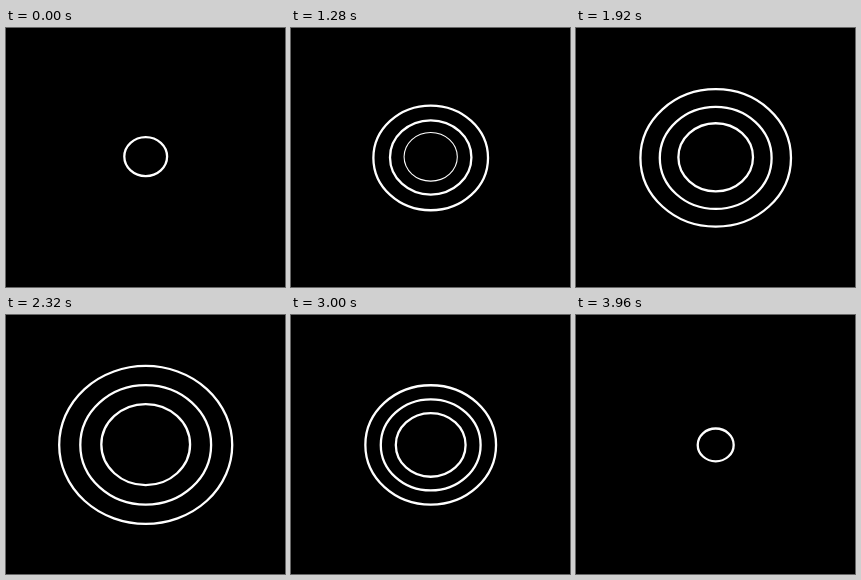
Write an HTML page with a canvas that moves like this. It is 279x259 px and loops after 4000 ms.

```html
<!DOCTYPE html>
<html lang="en">
<head>
<meta charset="utf-8">
<title>Pulsing rings</title>
<style>
  html, body { margin: 0; width: 100%; height: 100%; overflow: hidden; background: #000; }
  canvas { display: block; }
</style>
</head>
<body>
<canvas id="stage" width="279" height="259"></canvas>
<script>
const ctx = document.getElementById('stage').getContext('2d');
const LOOP = 4000, STEP = 40, PEAK = 2480;
const CENTER_X = 139.7, REST_Y = 129.9, SQUASH = 0.913;

// Keyframes are [time, horizontal radius] pairs.
const rings = [
  [[0, 21.4], [PEAK, 91], [LOOP, 16]],
  [[0, 10.3], [PEAK, 69.2], [LOOP, 12.8]],
  [[0, 3.4], [PEAK, 47.2], [LOOP, 11.2]]
];
// A black disc hides the smaller rings until they outgrow it.
const cover = [[0, 20.2], [1280, 26.1], [PEAK, 39.3], [LOOP, 15.6]];

function valueAt(keys, t) {
  const i = keys.findIndex(([time]) => time > t);
  const [t0, v0] = keys[i - 1], [t1, v1] = keys[i];
  return v0 + (v1 - v0) * (t - t0) / (t1 - t0);
}

function ellipsePath(r, y) {
  ctx.beginPath();
  ctx.ellipse(CENTER_X, y, r, r * SQUASH, 0, 0, Math.PI * 2);
}

// Small rings sit slightly higher while growing.
function centerY(r, t) {
  return t < PEAK ? Math.min(REST_Y, 128.6 + Math.max(0, r - 22) * 0.045) : REST_Y;
}

function strokeRing(keys, t) {
  const r = valueAt(keys, t);
  ellipsePath(r, centerY(r, t));
  ctx.stroke();
}

function draw(now) {
  const t = Math.floor((now % LOOP) / STEP) * STEP;
  ctx.fillStyle = '#000';
  ctx.fillRect(0, 0, 279, 259);
  ctx.strokeStyle = '#fff';
  ctx.lineWidth = 2.3;

  const [outer, ...inner] = rings;
  inner.forEach(keys => strokeRing(keys, t));
  const r = valueAt(cover, t);
  ellipsePath(r, centerY(r, t));
  ctx.fill();
  strokeRing(outer, t);
}

const start = performance.now();
function frame() {
  draw(performance.now() - start);
  requestAnimationFrame(frame);
}
frame();
</script>
</body>
</html>
```
